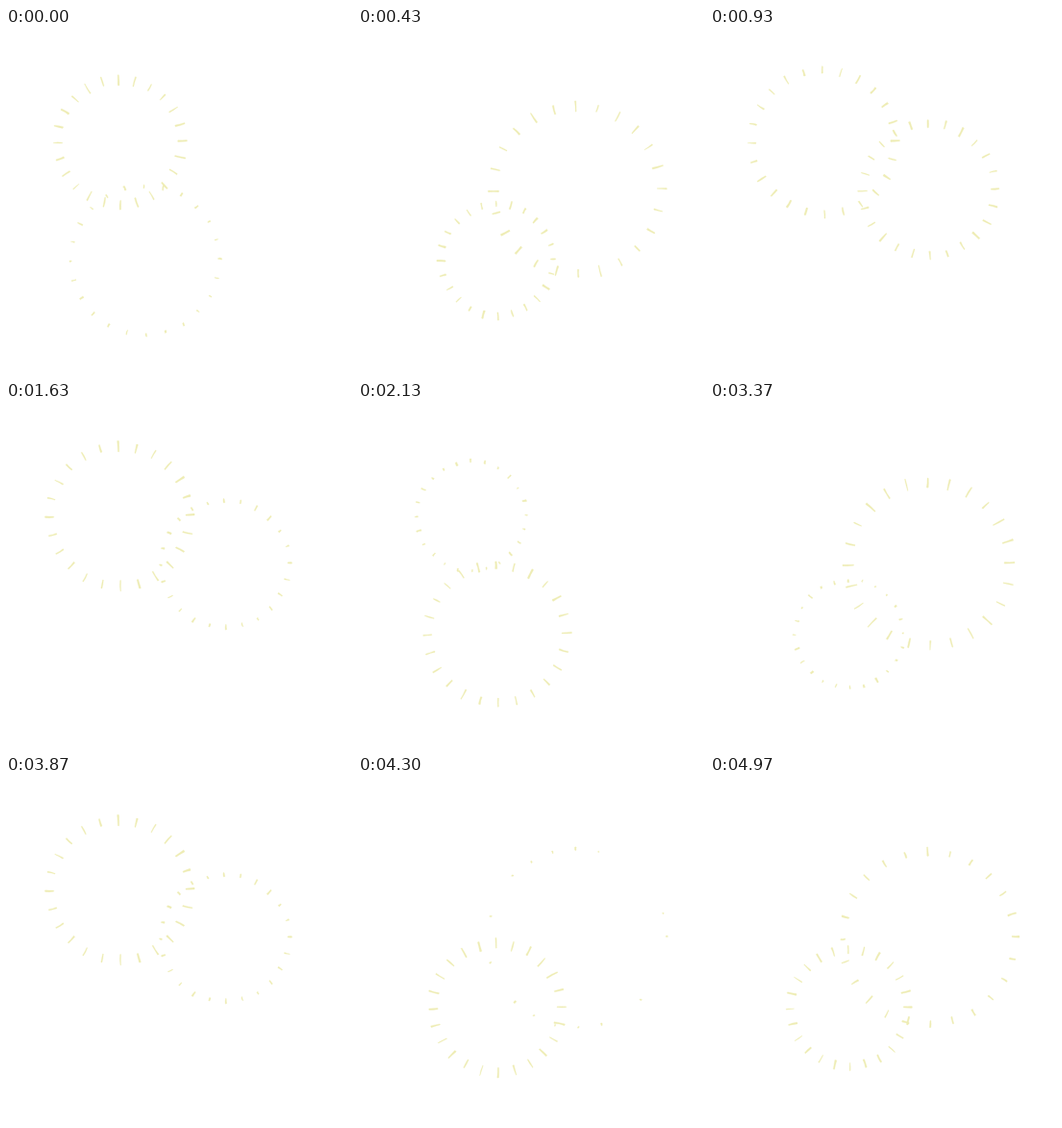
Write an HTML page that moves like this. It is 360 px wide and 360 px high and loops after 5.03 s.

```html
<!DOCTYPE html>
<html lang="en">
<head>
<meta charset="utf-8">
<title>Bursts</title>
<style>
  html, body { margin: 0; width: 100%; height: 100%; overflow: hidden; background: #fff; }
  svg { display: block; width: 100%; height: 100%; }
  path { fill: #eeecb4; stroke: #eeecb4; stroke-width: .3; stroke-linejoin: round; }
</style>
</head>
<body>
<svg viewBox="0 0 360 360"><path id="rays"/></svg>
<script>
const LOOP = 5030, FPS = 24, LAST = 119;
const CYCLE = 18, RAYS = 24, INNER = 0.68;
const TILT = -0.016;

// start: drawing in the cycle at which the burst opens
const bursts = [
  { x: 118, y: 118.5, r: 81, start: 14 },
  { x: 227.8, y: 168.5, r: 94.5, start: 2 },
  { x: 144.7, y: 241.4, r: 80, start: 8 }
];

const path = document.getElementById('rays');
const clamp = v => Math.max(0, Math.min(1, v));

function random(seed) {
  let s = seed;
  return () => {
    s = (s + 0x6D2B79F5) | 0;
    let t = Math.imul(s ^ (s >>> 15), 1 | s);
    t = (t + Math.imul(t ^ (t >>> 7), 61 | t)) ^ t;
    return ((t ^ (t >>> 14)) >>> 0) / 4294967296;
  };
}

const headAt = age => INNER + (1 - INNER) * Math.sin(clamp(age / 10) * Math.PI / 2);
const tailAt = age => INNER + (1 - INNER) * Math.pow(clamp((age - 2) / 9.6), 1.1);

// A hand-drawn dash: uneven ends and a slight bend
function dash(burst, angle, tail, head, rand) {
  const lean = (rand() - 0.5) * 1.2;
  const bend = (rand() - 0.5) * 0.5;
  const base = 0.45 + rand() * 0.45;
  const w0 = base + (rand() - 0.5) * 0.6;
  const w1 = base + (rand() - 0.5) * 0.6;
  const c = Math.cos(angle), s = Math.sin(angle);
  const at = (along, side) =>
    (burst.x + s * along + c * side).toFixed(2) + ' ' +
    (burst.y - c * along + s * side).toFixed(2);
  const mid = (tail + head) / 2;
  const off = lean / 2;
  return 'M' + [
    at(tail, -w0 - off), at(mid, -base + bend), at(head, -w1 + off),
    at(head + 0.3, off), at(head, w1 + off), at(mid, base + bend),
    at(tail, w0 - off), at(tail - 0.3, -off)
  ].join('L') + 'Z';
}

function drawBurst(burst, index, step) {
  const age = (step - burst.start + CYCLE * 2) % CYCLE;
  if (age < 1 || age > 12) return '';
  const rand = random(index * 7919 + age * 104729 + 17);
  let d = '';
  for (let i = 0; i < RAYS; i++) {
    const angle = i / RAYS * 2 * Math.PI + TILT;
    const tail = tailAt(age) + (rand() - 0.4) * 0.03;
    const head = Math.min(1, headAt(age) - (rand() - 0.2) * 0.03);
    if (head - tail > 0.01) d += dash(burst, angle, tail * burst.r, head * burst.r, rand);
  }
  return d;
}

let shown = -1;
function render(ms) {
  const frame = Math.min(LAST, Math.floor((ms % LOOP) * FPS / 1000 + 0.12));
  if (frame === shown) return;
  shown = frame;
  path.setAttribute('d', bursts.map((b, i) => drawBurst(b, i, frame % CYCLE)).join(''));
}

const begin = performance.now();
function tick() {
  render(performance.now() - begin);
  requestAnimationFrame(tick);
}
tick();
</script>
</body>
</html>
```
